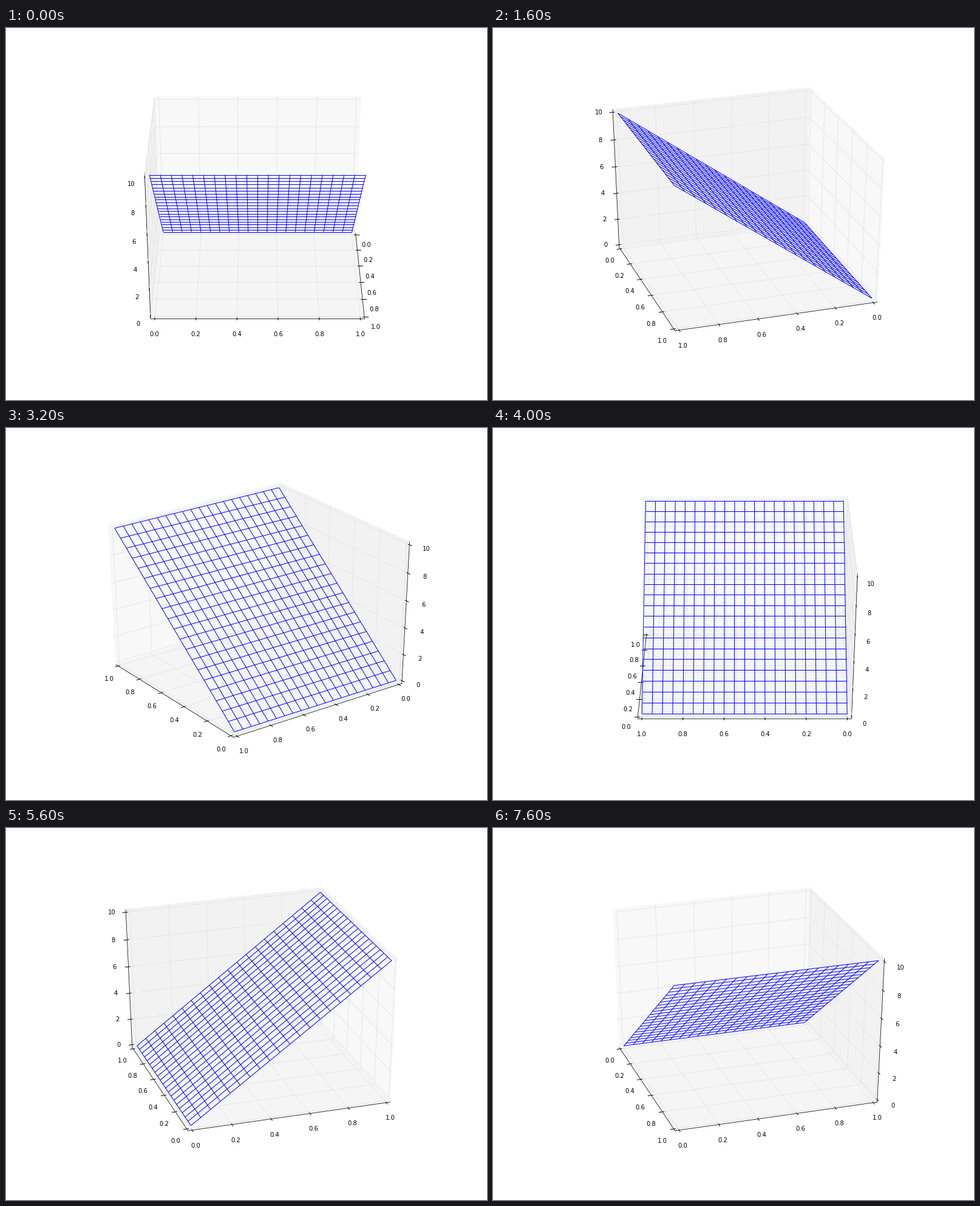
A matplotlib script for the animation above (8000 ms loop, 792 px wide and 612 px high).

```python
import numpy as np
import matplotlib.pyplot as plt
from matplotlib.animation import FuncAnimation
from matplotlib.collections import LineCollection
from matplotlib.patches import Polygon

W, H = 792, 612
FRAMES, INTERVAL = 20, 400
ELEV, DIST = np.radians(30), 10
VIEW_MIN, VIEW_SPAN = -0.095, 0.185   # visible window in projected units
PLOT = 0.125, 0.775                   # plot offset and size, as figure fractions
STEP = 1 / 12
PAD = STEP / 4                        # gap between data limits and box walls
TICKS = np.linspace(0, 1, 6)
PANE_GREYS = 0.95, 0.90, 0.925
SIDE_AXIS = 1, 0, 0                   # direction in which each axis' ticks point

plt.rcParams["font.family"] = "DejaVu Sans"
fig = plt.figure(figsize=(W / 72, H / 72), dpi=72, facecolor="white")
ax = fig.add_axes([0, 0, 1, 1])
ax.set(xlim=(0, W), ylim=(0, H))
ax.axis("off")


def project(points, azim):
    """Perspective view of unit-cube points, in pixels from the lower left."""
    p = np.asarray(points, float) - 0.5
    c, s = np.cos(azim), np.sin(azim)
    toward = p[..., 0] * c + p[..., 1] * s
    right = p[..., 1] * c - p[..., 0] * s
    up = p[..., 2] * np.cos(ELEV) - toward * np.sin(ELEV)
    depth = DIST - toward * np.cos(ELEV) - p[..., 2] * np.sin(ELEV)
    view = np.stack([right / depth, up / depth], axis=-1)
    return np.array([W, H]) * (PLOT[0] + PLOT[1] * (view - VIEW_MIN) / VIEW_SPAN)


def moved(point, axis, value):
    q = np.array(point, float)
    q[axis] = value
    return q


class BoxAxis:
    """One wall of the box with its axis line, grid, ticks and labels."""

    def __init__(self, index):
        self.i = index
        self.side = SIDE_AXIS[index]
        grey = (PANE_GREYS[index],) * 3 + (0.5,)
        self.pane = ax.add_patch(Polygon(np.zeros((4, 2)), closed=False, fc=grey,
                                         ec=grey, lw=1, zorder=index))
        z = 10 + 5 * index
        self.line, = ax.plot([], [], color="black", lw=0.75, zorder=z)
        self.grid = ax.add_collection(LineCollection(
            [], colors=[(0.9, 0.9, 0.9)], linewidths=1, zorder=z + 1), autolim=False)
        self.ticks = ax.add_collection(LineCollection(
            [], colors="black", linewidths=1, capstyle="projecting",
            zorder=z + 2), autolim=False)
        names = [f"{10 * t:.0f}" if index == 2 else f"{t:.1f}" for t in TICKS]
        self.labels = [ax.text(0, 0, n, size=10, ha="center", va="top", zorder=z + 3)
                       for n in names]

    def update(self, azim, far):
        i, side = self.i, self.side
        near = 1 - far

        square = np.array([[0, 0], [1, 0], [1, 1], [0, 1]]) * (1 + 2 * PAD) - PAD
        self.pane.set_xy(project(np.insert(square, i, far[i], axis=1), azim))

        edge = moved(far, side, near[side])
        ends = project([edge, moved(edge, i, near[i])], azim)
        self.line.set_data(ends[:, 0], ends[:, 1])

        grid, ticks = [], []
        sign = 1 if far[side] > 0.5 else -1
        a, b = (i + 1) % 3, (i + 2) % 3
        for t, label in zip(TICKS, self.labels):
            root = moved(far, i, t)
            grid.append([moved(root, a, near[a]), root, moved(root, b, near[b])])
            pos = moved(edge, i, t)
            ticks.append([moved(pos, side, pos[side] + k * sign * STEP)
                          for k in (0.1, -0.2)])
            spot = pos + 0.7 * STEP * np.where(pos < 0.5, -1, 1)
            label.set_position(project(moved(spot, i, t), azim))
        self.grid.set_segments(project(grid, azim))
        self.ticks.set_segments(project(ticks, azim))


def plane_lines(n=21):
    u = np.linspace(0, 1, n)
    x, y = np.meshgrid(u, u)
    surface = np.stack([x, y, x], axis=-1)
    return np.concatenate([surface, surface.transpose(1, 0, 2)])


box = [BoxAxis(i) for i in range(3)]
MESH = plane_lines()
wire = ax.add_collection(LineCollection([], colors=[(0, 0, 1)], linewidths=1,
                                        zorder=40), autolim=False)


def draw(frame):
    azim = np.radians(frame * 360 / FRAMES)
    high = np.array([np.cos(azim) < 0, np.sin(azim) < 0, False])
    far = np.where(high, 1 + PAD, -PAD)
    for axis in box:
        axis.update(azim, far)
    wire.set_segments(project(MESH, azim))
    return []


ax.set(xlim=(0, W), ylim=(0, H))
anim = FuncAnimation(fig, draw, frames=FRAMES, interval=INTERVAL, repeat=True)
plt.show()
```
